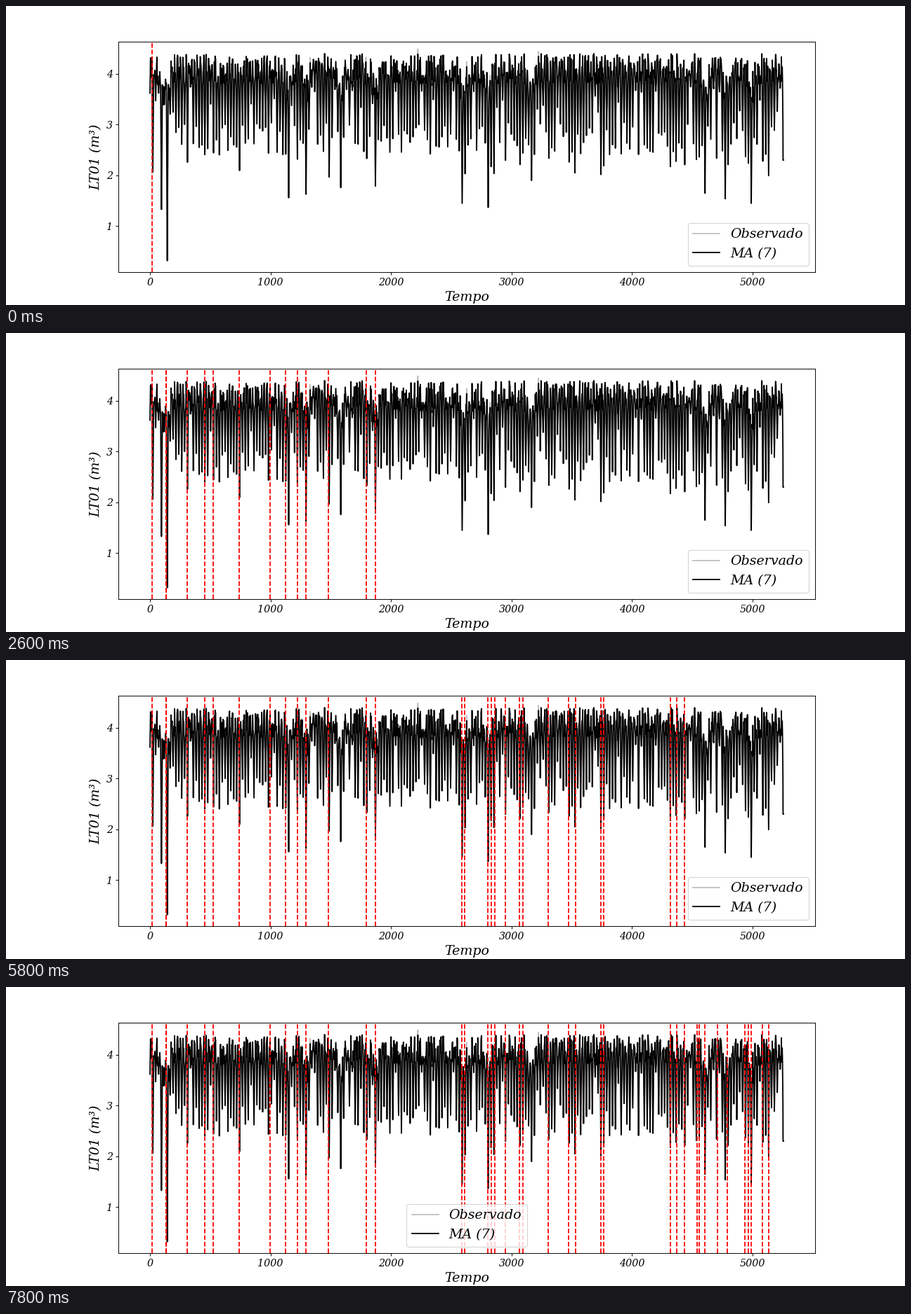
Write a matplotlib script that moves like this. It is 1280 px wide and 427 px high and loops after 8 s.

```python
import numpy as np
import matplotlib.pyplot as plt
from matplotlib.animation import FuncAnimation

plt.rcParams.update({
    "font.family": "DejaVu Serif",
    "font.style": "italic",
    "xtick.labelsize": 12,
    "ytick.labelsize": 12,
    "axes.labelsize": 16,
    "legend.fontsize": 16,
})

HOURS = 5259

# Hours of the detected events: each lowers that day's minimum
# and gets one marker.
EVENTS = [
    19, 132, 134, 308, 453, 524, 740, 994, 1122, 1222,
    1291, 1482, 1795, 1870, 2591, 2612, 2804, 2833, 2865, 2950,
    3066, 3093, 3306, 3474, 3530, 3740, 3766, 4317, 4373, 4437,
    4542, 4556, 4606, 4708, 4795, 4938, 4967, 4988, 5084, 5134,
]
LEGEND_MOVE = 38

# Deepest daily minima (day: level); the upper level sags around them.
DEEPEST = {4: 1.33, 6: 0.32, 48: 1.56, 54: 1.63, 66: 1.76, 78: 1.79,
           108: 1.45, 117: 1.37, 132: 1.9, 192: 1.65, 199: 1.54, 208: 1.45}


def daily_low(day, event_days, rng):
    if day in DEEPEST:
        return DEEPEST[day]
    if day in event_days:
        return rng.uniform(1.95, 2.45)
    weekend = day % 7 < 2
    if rng.random() < (0.5 if weekend else 0.08):
        return rng.uniform(3.2, 3.8)
    return rng.uniform(2.4, 3.05)


def tank_level(rng):
    t = np.arange(HOURS)
    knots = np.arange(0, HOURS + 3, 3)
    top = np.interp(t, knots, rng.uniform(3.8, 4.4, knots.size))
    for day in DEEPEST:
        top -= 0.4 * np.exp(-((t / 24 - day) / 1.2) ** 2)
    level = top.copy()
    event_days = {round(hour / 24) for hour in EVENTS}
    for day in range(1, HOURS // 24 + 1):
        low = daily_low(day, event_days, rng)
        dip = np.clip(1 - np.abs(t - (24 * day - 1)) / 7, 0, 1)
        level -= np.maximum(top - low, 0) * dip
    level[:4] = np.linspace(3.62, 4.2, 4)
    level[-4:] = 2.3
    return t, level


rng = np.random.default_rng(7)
hours, average = tank_level(rng)
observed = average + 0.1 * (rng.random(HOURS) < 0.006)

fig, ax = plt.subplots(figsize=(15, 1281 / 256), dpi=256 / 3)
ax.plot(hours, observed, color="silver", label="Observado")
ax.plot(hours, average, color="black", label="MA (7)")
ax.set_xlim(-262.9, 5520.9)
ax.set_ylim(0.095, 4.63)
ax.set_yticks(range(1, 5))
ax.set_xlabel("Tempo")
ax.set_ylabel("LT01 (m³)")
legend = ax.legend(loc="lower right")
markers = [ax.axvline(hour, color="red", linestyle="--") for hour in EVENTS]


def update(frame):
    for i, marker in enumerate(markers):
        marker.set_visible(i <= frame)
    legend.set_loc("lower center" if frame >= LEGEND_MOVE else "lower right")
    return markers + [legend]


def reset():
    return update(0)


animation = FuncAnimation(fig, update, frames=len(EVENTS), init_func=reset,
                          interval=200, repeat=True, repeat_delay=0)
plt.show()
```
